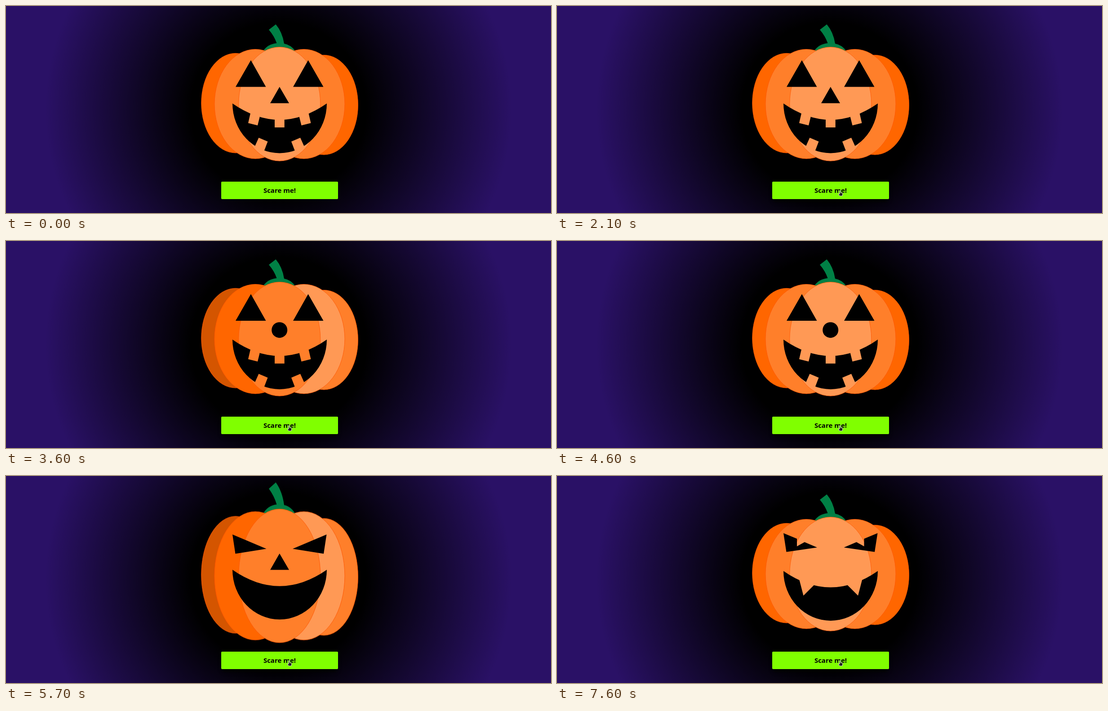
An HTML page that plays this animation: 1213x462 px, repeating every 8000 ms.

```html
<!DOCTYPE html>
<html lang="en">
<head>
<meta charset="utf-8">
<title>Pumpkin</title>
<style>
  html, body { margin: 0; width: 100%; height: 100%; overflow: hidden; }
  body {
    position: relative;
    background: radial-gradient(circle at 50% 50%, #000 30%, #2a1166 80%);
  }
  svg { position: absolute; left: 0; top: 0; display: block; }

  /* Pumpkin */
  .pumpkin { animation: stretch 8s step-end infinite; }
  .scene { animation: tint 8s step-end infinite; }
  .pumpkin ellipse { stroke: #ff5500; stroke-width: .8; }
  .outer-l { fill: var(--outer-l); }
  .outer-r { fill: var(--outer-r); }
  .inner-l { fill: var(--inner-l); }
  .inner-r { fill: var(--inner-r); }
  .front, .tooth { fill: var(--front); }
  .stem { fill: #008045; }

  @keyframes tint {
    0%, 57.5%, 83.75%, 100% {
      --outer-l: #ff6600; --inner-l: #ff7f2a; --front: #ff9955;
      --inner-r: #ff7f2a; --outer-r: #ff6600;
    }
    45%, 71.25% {
      --outer-l: #d45500; --inner-l: #ff6600; --front: #ff7f2a;
      --inner-r: #ff9955; --outer-r: #ff7f2a;
    }
  }
  @keyframes stretch {
    0%, 83.75%, 100% { transform: none; }
    71.25% { transform: translateY(-33.8px) scaleY(1.173); }
  }

  /* Faces, one after the other */
  .face { opacity: 0; animation: 8s step-end infinite; }
  .happy { animation-name: happy; }
  .sly { animation-name: sly; }
  .clown { animation-name: clown; }
  .angry { animation-name: angry; }
  .round { animation-name: round; }
  .fangs { animation-name: fangs; }
  @keyframes happy { 0% { opacity: 1; } 40%, 100% { opacity: 0; } }
  @keyframes sly { 0% { opacity: 0; } 40% { opacity: 1; } 45%, 100% { opacity: 0; } }
  @keyframes clown { 0% { opacity: 0; } 45% { opacity: 1; } 71.25%, 100% { opacity: 0; } }
  @keyframes angry { 0% { opacity: 0; } 71.25% { opacity: 1; } 83.75%, 100% { opacity: 0; } }
  @keyframes round { 0% { opacity: 0; } 83.75% { opacity: 1; } 95%, 100% { opacity: 0; } }
  @keyframes fangs { 0% { opacity: 0; } 95%, 100% { opacity: 1; } }

  /* Button */
  .button {
    position: absolute; left: 479px; top: 392px; width: 260px; height: 39px;
    border-radius: 2px; background: #80ff00; color: #000;
    font: 700 15px/39px "Noto Sans", "Open Sans", sans-serif; text-align: center;
    animation: hover 8s step-end infinite, press 8s step-end infinite;
  }
  @keyframes hover {
    0%, 17.5% { box-shadow: none; }
    16.25%, 23.75%, 100% { box-shadow: 0 8px 8px -3px #000; }
  }
  @keyframes press {
    0%, 45%, 57.5%, 71.25%, 83.75%, 95%, 100% { transform: none; }
    42.5%, 56.25%, 68.75%, 82.5%, 93.75% { transform: translateY(2px); }
  }

  /* Pointer */
  .pointer { animation: travel 8s linear infinite, appear 8s step-end infinite; }
  .pointer path { fill: #222; stroke: #fff; stroke-width: .9; stroke-linejoin: round; }
  .arrow { animation: arrow 8s step-end infinite; }
  .hand { animation: hand 8s step-end infinite; }
  @keyframes travel {
    0% { transform: translate(43px, 93px); }
    7.5% { transform: translate(43px, 93px); animation-timing-function: ease-in-out; }
    17.5%, 20% { transform: translate(613.5px, 434px); }
    21.25%, 22.5% { transform: translate(615px, 434px); }
    26.25%, 100% { transform: translate(629px, 411.5px); }
  }
  @keyframes appear { 0% { opacity: 0; } 7.5%, 100% { opacity: 1; } }
  @keyframes arrow { 0%, 17.5% { opacity: 1; } 16.25%, 23.75%, 100% { opacity: 0; } }
  @keyframes hand { 0%, 17.5% { opacity: 0; } 16.25%, 23.75%, 100% { opacity: 1; } }
</style>
</head>
<body>
<svg class="scene" width="1213" height="462" viewBox="0 0 1213 462">
  <defs>
    <path id="eye" d="M545 0L578.5 59.5H511Z"/>
    <path id="slant" d="M504 0L579.5 32L510.5 43Z"/>
    <path id="slant-round" d="M504 0L534 12.7A9.2 9.2 0 1 0 550.5 20L579.5 32L510.5 42.7Z"/>
    <path id="slant-cut" d="M504 0L534 12.5V29.5L551 20L579 32L510.5 42Z"/>
    <path id="nose" d="M608.8 0L630 36.5H588Z"/>
    <path id="mouth" d="M504 0Q609 73 714 0A105 111 0 0 1 504 0Z"/>
    <g id="side-teeth" class="tooth">
      <path d="M544 22L539 43.8L560 49L564.5 31V27Z"/>
      <path d="M553.5 96.5L562.5 76.5L582.5 85L574.5 106Z"/>
    </g>
    <path id="fang" class="tooth" d="M539 19L539.7 21L548.5 55L571.5 32V29Z"/>
    <g id="toothy">
      <use href="#mouth"/>
      <use href="#side-teeth"/>
      <use href="#side-teeth" transform="matrix(-1 0 0 1 1217.5 0)"/>
      <path class="tooth" d="M598 34H619.7V53.5H598Z"/>
    </g>
    <g id="slants">
      <use href="#slant"/>
      <use href="#slant" transform="matrix(-1 0 0 1 1217.5 0)"/>
    </g>
    <g id="eyes">
      <use href="#eye"/>
      <use href="#eye" transform="matrix(-1 0 0 1 1217.5 0)"/>
    </g>
  </defs>

  <g class="pumpkin">
    <path class="stem" d="M600.5 41L585 53Q597 67 602.5 83Q582 85 572 101H644Q635 87 619 84Q615 58 600.5 41Z"/>
    <ellipse class="outer-l" cx="511" cy="216.7" rx="76.3" ry="111.3"/>
    <ellipse class="outer-r" cx="707.5" cy="220.7" rx="76" ry="111.3"/>
    <ellipse class="inner-l" cx="555" cy="218.7" rx="91" ry="122.2"/>
    <ellipse class="inner-r" cx="663" cy="218.7" rx="91" ry="122.2"/>
    <ellipse class="front" cx="608.8" cy="218.8" rx="91" ry="127.2"/>
  </g>

  <g class="face happy">
    <use href="#eyes" y="121"/>
    <use href="#nose" y="180.5"/>
    <use href="#toothy" y="217.5"/>
  </g>
  <g class="face sly">
    <use href="#slants" y="130.5"/>
    <use href="#nose" y="173"/>
    <use href="#toothy" y="209.5"/>
  </g>
  <g class="face clown">
    <use href="#eyes" y="118.5"/>
    <circle cx="608.7" cy="198.7" r="17.5"/>
    <use href="#toothy" y="220"/>
  </g>
  <g class="face angry">
    <use href="#slants" y="130.5"/>
    <use href="#nose" y="173"/>
    <use href="#mouth" y="209.3"/>
  </g>
  <g class="face round">
    <use href="#slant-round" y="128"/>
    <use href="#slant-round" transform="matrix(-1 0 0 1 1217.5 128)"/>
    <use href="#mouth" y="212"/>
  </g>
  <g class="face fangs">
    <use href="#slant-cut" y="127.5"/>
    <use href="#slant-cut" transform="matrix(-1 0 0 1 1217.5 127.5)"/>
    <use href="#mouth" y="212"/>
    <use href="#fang" y="212"/>
    <use href="#fang" transform="matrix(-1 0 0 1 1218.5 212)"/>
  </g>
</svg>

<div class="button">Scare me!</div>

<svg width="1213" height="462" viewBox="0 0 1213 462">
  <g class="pointer">
    <path class="arrow" d="M.5 .5V13L3.6 10.2L5.6 14.5L7.8 13.5L5.9 9.4H10Z"/>
    <path class="hand" d="M0 1Q1.2 -.4 2.2 1V5L5.6 5.6Q7.2 6 7 8L6 12.5H0L-2.6 8.4Q-2.6 6.6 0 8Z"/>
  </g>
</svg>
</body>
</html>
```
